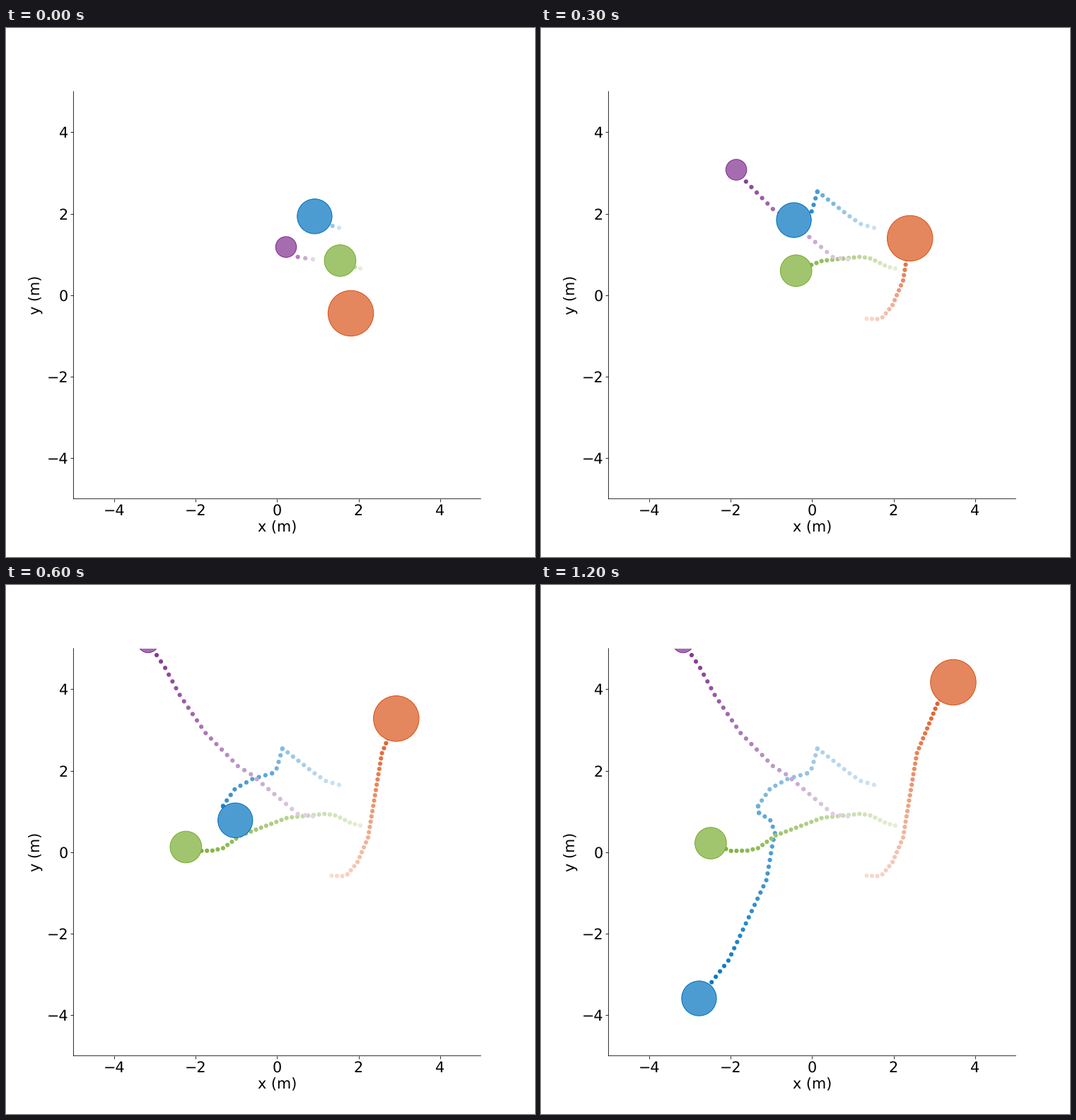
These frames come from a looping animation (748x748 px, 2200 ms). A matplotlib script:

```python
import numpy as np
import matplotlib.pyplot as plt
from matplotlib.animation import FuncAnimation
from matplotlib.colors import to_rgb
from matplotlib.patches import Circle

DPI = 74.8
PX_PER_M = 57.6
CENTER = np.array([383.4, 377.7])   # stage position of the axes origin
FRAMES = 22
STEPS_PER_FRAME = 5
LAST_STEP = 64


def tint(color, strength):
    """Blend a colour with white."""
    return 1 - (1 - np.array(to_rgb(color))) * strength


def drive(corners, moves):
    """Points at equal distances along a route, in metres."""
    points = np.array(corners)
    legs = np.hypot(*np.diff(points, axis=0).T)
    travelled = np.concatenate([[0], np.cumsum(legs)])
    s = np.linspace(0, travelled[-1], moves + 1)
    x, y = (np.interp(s, travelled, p) for p in points.T)
    return np.column_stack([x - CENTER[0], CENTER[1] - y]) / PX_PER_M


class Robot:
    """A disc that drives at constant speed and leaves dots behind."""

    def __init__(self, ax, color, radius, moves, corners, layer, waits=None):
        stay = np.ones(moves + 1, dtype=int)
        for move, extra in (waits or {}).items():
            stay[move] += extra
        self.path = np.repeat(drive(corners, moves), stay, axis=0)
        self.color = color
        self.trail = ax.scatter([], [], s=(6.2 * 72 / DPI) ** 2,
                                linewidths=0, zorder=3 + layer)
        self.disc = Circle(self.path[0], radius / PX_PER_M, lw=1,
                           fc=tint(color, 0.7), ec=color, zorder=10 + layer)
        ax.add_patch(self.disc)

    def show(self, step):
        n = min(step, len(self.path) - 1)
        strength = np.linspace(0.2, 1, n + 1)[:-1]
        self.trail.set_offsets(self.path[:n])
        self.trail.set_facecolors([tint(self.color, s) for s in strength])
        self.disc.center = self.path[n]


plt.rcParams.update({"font.family": "DejaVu Sans", "font.size": 20,
                     "text.hinting": "no_hinting"})
fig, ax = plt.subplots(figsize=(10, 10), dpi=DPI)
ax.set(xlim=(-5, 5), ylim=(-5, 5),
       xticks=range(-4, 5, 2), yticks=range(-4, 5, 2))
ax.set_xlabel("x (m)", labelpad=3)
ax.set_ylabel("y (m)")
ax.set_aspect("equal")
ax.spines[["top", "right"]].set_visible(False)
for side in ("left", "bottom"):
    ax.spines[side].set_snap(False)

robots = [
    # Blue stops now and then to let the others pass.
    Robot(ax, "#0072BD", 24.6, 55, [
        (471, 282.5), (452, 277), (436, 266), (391, 231), (383, 259),
        (377, 266), (349, 274), (324, 288), (307, 312), (308, 322),
        (324, 332), (331, 350), (327, 369), (319, 416.5), (265, 531),
        (223.5, 584.5),
    ], 0, waits={10: 2, 14: 1, 23: 3, 24: 2}),
    Robot(ax, "#D95319", 32.2, 42, [
        (460.5, 411), (475.5, 411.5), (483, 409), (497, 392), (512, 357),
        (531.5, 238), (560.5, 168), (583, 137.5),
    ], 1),
    Robot(ax, "#77AC30", 22.3, 36, [
        (501, 340), (488.5, 337), (467, 326), (452, 323.5), (398, 329),
        (332, 354), (307, 372), (292, 375.5), (269, 376), (240, 365),
    ], 2),
    Robot(ax, "#7E2F8E", 14.7, 32, [
        (434, 327), (413, 324), (347, 268), (328, 256), (282, 209),
        (246, 156), (225, 117), (201, 81),
    ], 3),
]


def update(frame):
    step = min(STEPS_PER_FRAME * (frame + 1) - 1, LAST_STEP)
    for robot in robots:
        robot.show(step)
    return [part for r in robots for part in (r.trail, r.disc)]


anim = FuncAnimation(fig, update, frames=FRAMES, interval=100, repeat=True,
                     repeat_delay=0, init_func=lambda: update(0))
plt.show()
```
